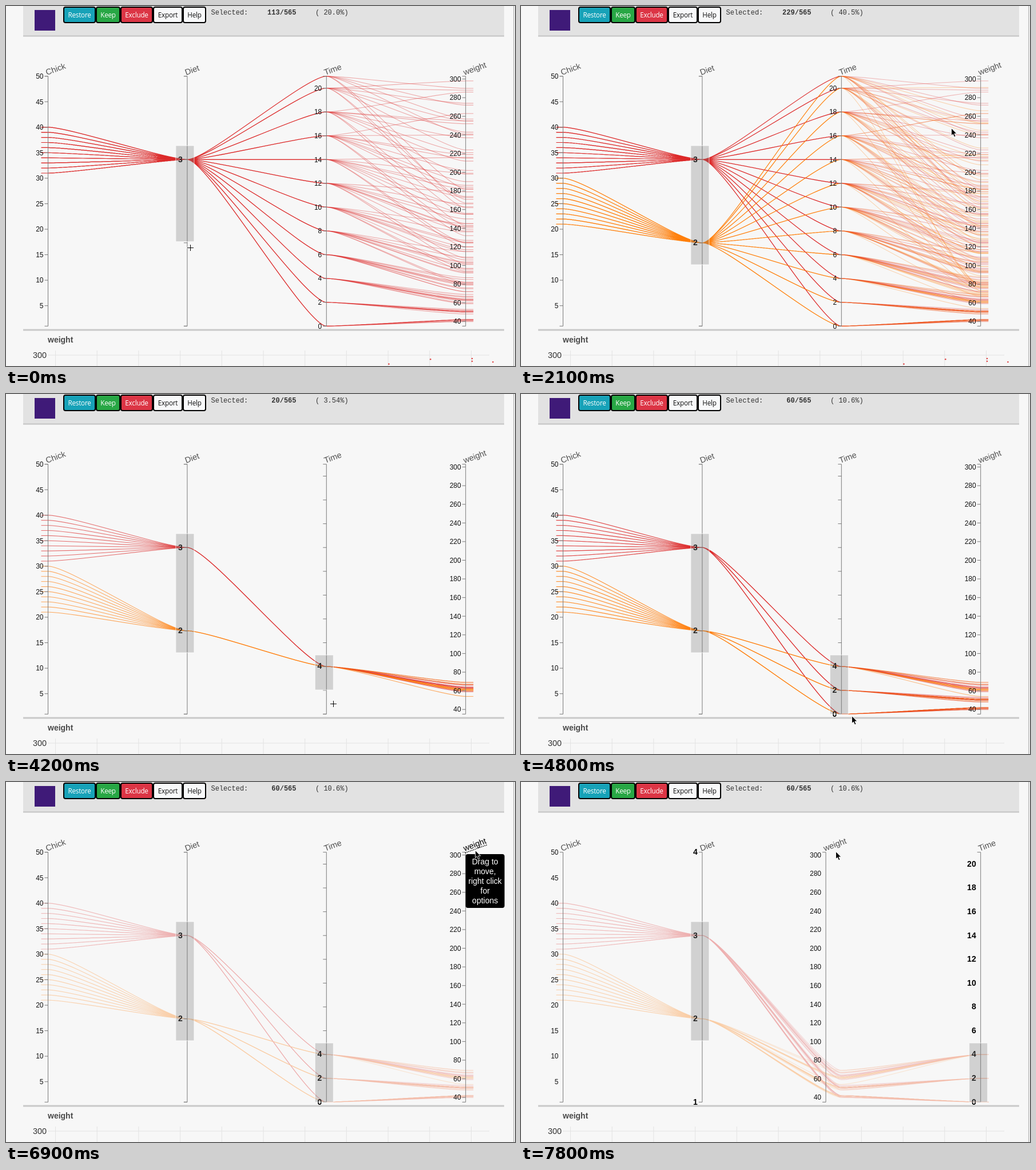
Write an HTML page with a canvas that moves like this. It is 890 px wide and 629 px high and loops after 8 s.

```html
<!DOCTYPE html>
<html lang="en">
<head>
<meta charset="utf-8">
<title>Parallel coordinates</title>
<style>
  html, body { margin: 0; width: 100%; height: 100%; overflow: hidden; background: #f7f7f7; }
  canvas, svg { position: absolute; left: 0; top: 0; width: 890px; height: 629px; }
  svg { font: 12px "Liberation Sans", Arial, sans-serif; }
  .domain, .tick { fill: none; stroke: #7a7a7a; }
  .label { text-anchor: end; fill: #111; }
  .label.bold { font-size: 14px; font-weight: bold; fill: #000; }
  .title { font-size: 14.4px; fill: #505050; }
  .hover .title { fill: #000; }
  .underline { stroke: #000; stroke-width: 1.5; stroke-dasharray: 1.5 1.5; visibility: hidden; }
  .hover .underline { visibility: visible; }
  .brush { fill: #777; fill-opacity: .3; stroke: #fff; stroke-opacity: .7; }
  .button { stroke: #000; stroke-width: 2; }
  .caption { font: 11.7px "Open Sans", "Noto Sans", sans-serif; letter-spacing: -.2px; text-anchor: middle; }
  .mono { font: 12px "Liberation Mono", "Courier New", monospace; fill: #333; white-space: pre; }
  .strong { font-weight: bold; text-anchor: end; }
  .grid { stroke: #e3e3e3; fill: none; }
  .tip text { font-size: 14px; fill: #fff; text-anchor: middle; }
</style>
</head>
<body>
<canvas id="lines" width="1780" height="1258"></canvas>
<svg id="stage" viewBox="0 0 890 629"></svg>
<script>
const LOOP = 8000, STEP = 150, TOTAL = 565;
const TOP = 122.7, BOTTOM = 559.3;
const SLOTS = [0, 1, 2, 3].map(i => 73.5 + i * 243.4);
const COLORS = { 2: '#ff7f0e', 3: '#db2b2b' };

// Growth acceleration of chicks 21 to 40, in hundredths.
const VIGOUR = [60, 10, 13, -13, 31, 28, 15, 25, 41, 7, 29, 41, 8, 51, 60, 24, 11, 36, 32, 42];

const range = (from, to, step) =>
  Array.from({ length: Math.floor((to - from) / step) + 1 }, (_, i) => from + i * step);

let seed = 11;
const random = () => (seed = seed * 16807 % 2147483647) / 2147483647;

const DIMS = {
  Chick: { min: 1, max: 50, ticks: range(5, 50, 5) },
  Diet: { min: 1, max: 4, ticks: range(1, 4, 1) },
  Time: { min: 0, max: 21, ticks: range(0, 20, 2) },
  weight: { min: 35, max: 303, ticks: range(40, 300, 20) }
};

const yOf = (name, v) => {
  const { min, max } = DIMS[name];
  return BOTTOM - (v - min) / (max - min) * (BOTTOM - TOP);
};

const rows = [];
VIGOUR.forEach((vigour, i) => {
  for (const age of [...range(0, 20, 2), 21]) {
    const noise = (random() * 2 - 1) * (1.5 + age / 10);
    const weight = Math.round(41 + 4.3 * age + vigour / 100 * age * age + noise);
    if (weight <= DIMS.weight.max) {
      rows.push({ Chick: 21 + i, Diet: i < 10 ? 2 : 3, Time: age, weight, rank: random() });
    }
  }
});
rows.sort((a, b) => a.rank - b.rank);

// Linear track through [time, ...values] points, held at both ends.
function track(points, t) {
  const i = points.findIndex(p => p[0] > t);
  if (i === 0) return points[0].slice(1);
  if (i < 0) return points[points.length - 1].slice(1);
  const a = points[i - 1], b = points[i], k = (t - a[0]) / (b[0] - a[0]);
  return a.slice(1).map((v, j) => v + (b[j + 1] - v) * k);
}

const POINTER = [
  [0, 322, 422], [750, 324, 457], [900, 324, 457],
  [1200, 811, 317], [1500, 806, 543], [2100, 752, 213], [2700, 752, 213],
  [3300, 541, 443], [3750, 546, 456], [4200, 572, 541], [4800, 578, 562], [5400, 578, 562],
  [5700, 746, 281], [5850, 746, 281], [6150, 817, 130], [6300, 820, 119], [6900, 820, 119],
  [7200, 676, 119], [7500, 566, 121], [7800, 550, 121]
];
const DIET_END = [[0, 411.7], [750, 452]];
const TIME_END = [[3900, 480], [4200, 517], [4650, BOTTOM]];
const WEIGHT_X = [[6900, SLOTS[3]], [7200, 685.5], [7500, 555], [7800, 533]];

const stage = document.getElementById('stage');
const ctx = document.getElementById('lines').getContext('2d');
ctx.scale(2, 2);

function add(parent, tag, attrs = {}, text) {
  const el = document.createElementNS('http://www.w3.org/2000/svg', tag);
  for (const k in attrs) el.setAttribute(k, attrs[k]);
  if (text !== undefined) el.textContent = text;
  parent.appendChild(el);
  return el;
}
const show = (el, on) => { el.style.visibility = on ? 'visible' : 'hidden'; };
const move = (el, x, y) => el.setAttribute('transform', `translate(${x} ${y})`);
const box = (x, y, width, height, fill) => add(stage, 'rect', { x, y, width, height, fill });

// Header
box(30, 0, 841, 52, '#e2e2e2');
box(30, 51.5, 841, 2, '#c3c3c3');
box(887, 0, 1.5, 629, '#bdbdbd');
box(50, 7, 36, 36, '#3f1a78');
let left = 100;
[
  ['Restore', 57, '#17a2b8', '#fff'], ['Keep', 43, '#28a745', '#fff'], ['Exclude', 57, '#dc3545', '#fff'],
  ['Export', 52, '#f8f9fa', '#111'], ['Help', 41, '#f8f9fa', '#111']
].forEach(([name, width, fill, ink]) => {
  add(stage, 'rect', { class: 'button', x: left + 1, y: 2, width: width - 2, height: 27, rx: 3, fill });
  add(stage, 'text', { class: 'caption', x: left + width / 2, y: 19.5, fill: ink }, name);
  left += width;
});
add(stage, 'text', { class: 'mono', x: 358.5, y: 15 }, 'Selected:');
const count = add(stage, 'text', { class: 'mono strong', x: 507.5, y: 15 });
const percent = add(stage, 'text', { class: 'mono', x: 541, y: 15 });

// Scatter plot below
box(30, 564.5, 841, 3, '#c9c9c9');
add(stage, 'text', { x: 73, y: 588, fill: '#4a4a4a', style: 'font-size:14px;font-weight:bold' }, 'weight');
add(stage, 'text', { x: 47, y: 615, fill: '#333', style: 'font-size:14.4px' }, '300');
add(stage, 'path', { class: 'grid', d: 'M73 610H845' + range(0, 10, 1).map(i => `M${86.5 + i * 72.7} 602V629`).join('') });
const dots = add(stage, 'g', { fill: '#e04545' });
[[16, 287], [18, 294], [20, 295], [20, 291], [21, 290]].forEach(([age, w]) =>
  add(dots, 'circle', { cx: 87 + age * 36.4, cy: 610 + (300 - w) * 1.2, r: 1.3 }));

// Axes
const axes = {};
for (const name in DIMS) {
  const g = add(stage, 'g');
  add(g, 'path', { class: 'domain', d: `M-6 ${TOP}H0V${BOTTOM}H-6` });
  const ticks = add(g, 'path', { class: 'tick', d: DIMS[name].ticks.map(v => `M-6 ${yOf(name, v)}H0`).join('') });
  const labels = DIMS[name].ticks.map(v => {
    const y = yOf(name, v);
    return { y, el: add(g, 'text', { class: 'label', x: -8, y: y + 4.3 }, v) };
  });
  const head = add(g, 'g', { transform: 'translate(-2 121) rotate(-20)' });
  add(head, 'text', { class: 'title' }, name);
  if (name === 'weight') add(head, 'path', { class: 'underline', d: 'M0 3H42' });
  axes[name] = { g, ticks, labels };
}
const brushes = {};
for (const name of ['Diet', 'Time']) brushes[name] = add(stage, 'rect', { class: 'brush', width: 32 });

// Tooltip and pointers
const tip = add(stage, 'g', { class: 'tip' });
add(tip, 'rect', { y: 126, width: 68, height: 94, rx: 4 });
['Drag to', 'move,', 'right click', 'for', 'options'].forEach((s, i) =>
  add(tip, 'text', { x: 34, y: 143.5 + i * 17.1 }, s));
const cross = add(stage, 'g', { fill: 'none' });
add(cross, 'path', { d: 'M-6 .5H7M.5 -6V7', stroke: '#fff', 'stroke-width': 2.4, 'stroke-opacity': .6 });
add(cross, 'path', { d: 'M-5 .5H6M.5 -5V6', stroke: '#000' });
const arrow = add(stage, 'path', {
  d: 'M.5 .5V13.5L3.4 10.9L5.6 15.8L7.9 14.8L5.8 10H9.8Z', stroke: '#fff', 'stroke-width': .9
});

function drawLines(selected, order, dim) {
  ctx.clearRect(0, 0, 890, 629);
  ctx.lineWidth = 1.05;
  ctx.globalAlpha = 1.65 / Math.pow(selected.length, .3);
  for (const row of selected) {
    ctx.strokeStyle = COLORS[row.Diet];
    ctx.beginPath();
    order.forEach((name, i) => {
      const x = SLOTS[i], y = yOf(name, row[name]);
      if (i === 0) {
        ctx.moveTo(x - 12, y);
        ctx.lineTo(x, y);
      } else {
        const px = SLOTS[i - 1], py = yOf(order[i - 1], row[order[i - 1]]), bend = .15 * (x - px);
        ctx.bezierCurveTo(px + bend, py, x - bend, y, x, y);
      }
      if (i === 3) ctx.lineTo(x + 13.5, y);
    });
    ctx.stroke();
  }
  ctx.canvas.style.opacity = dim ? .35 : 1;
}

let drawn = '';
function render(t) {
  const limits = { Diet: [244, track(DIET_END, t)[0]] };
  if (t >= 3900) limits.Time = [456, track(TIME_END, t)[0]];
  const inside = (name, y) => !limits[name] || (y >= limits[name][0] && y <= limits[name][1]);

  const weightX = track(WEIGHT_X, t)[0];
  const swapped = weightX < SLOTS[2];
  const order = swapped ? ['Chick', 'Diet', 'weight', 'Time'] : ['Chick', 'Diet', 'Time', 'weight'];
  const hover = t >= 6300 && !swapped;
  const dim = t >= 6900;

  const selected = rows.filter(r => inside('Diet', yOf('Diet', r.Diet)) && inside('Time', yOf('Time', r.Time)));
  const key = [selected.length, swapped, dim].join();
  if (key !== drawn) {
    drawLines(selected, order, dim);
    drawn = key;
  }
  count.textContent = `${selected.length}/${TOTAL}`;
  percent.textContent = `( ${(selected.length / TOTAL * 100).toPrecision(3)}%)`;
  show(dots, !limits.Time);

  order.forEach((name, i) => {
    const { g, ticks, labels } = axes[name], x = name === 'weight' ? weightX : SLOTS[i];
    move(g, x, 0);
    show(ticks, !swapped);
    for (const { y, el } of labels) {
      el.classList.toggle('bold', !!limits[name]);
      show(el, swapped || inside(name, y));
    }
    const brush = brushes[name];
    if (!brush) return;
    show(brush, limits[name]);
    if (limits[name]) {
      const [from, to] = limits[name];
      brush.setAttribute('x', x - 20);
      brush.setAttribute('y', from);
      brush.setAttribute('height', to - from);
    }
  });
  axes.weight.g.classList.toggle('hover', hover);
  show(tip, hover);
  move(tip, weightX, 0);

  const [px, py] = track(POINTER, t);
  const dragging = t < 900 || (t >= 3900 && t < 4800);
  const onAxis = py > TOP && py < BOTTOM && SLOTS.some(x => px >= x - 20 && px <= x + 12);
  const crossed = dragging || onAxis;
  show(cross, crossed);
  show(arrow, !crossed);
  move(cross, Math.round(px), Math.round(py));
  move(arrow, px, py);
}

const start = performance.now();
function frame() {
  const t = (performance.now() - start) % LOOP;
  render(Math.min(Math.floor(t / STEP) * STEP, 7800));
  requestAnimationFrame(frame);
}
frame();
</script>
</body>
</html>
```
